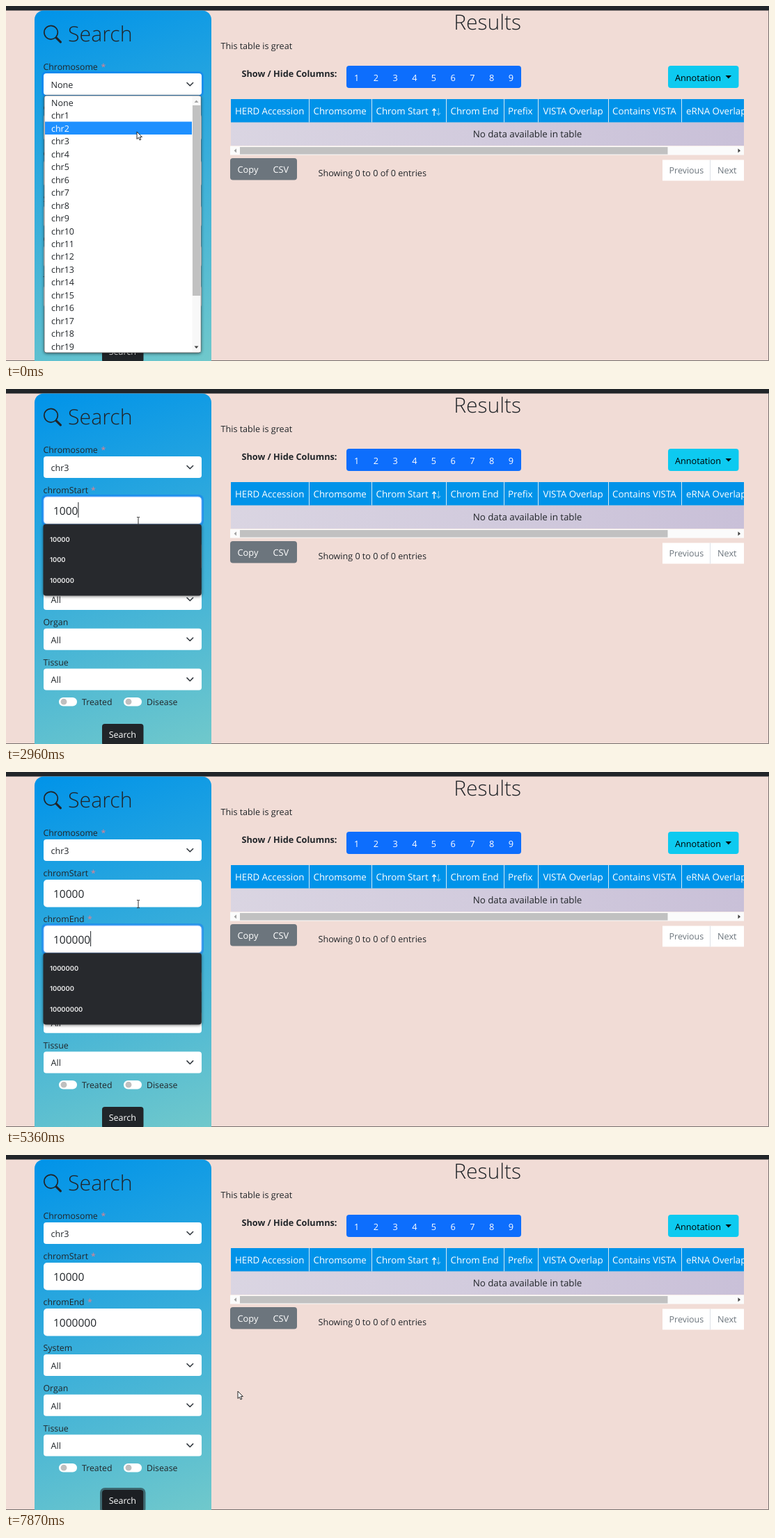
Write an HTML page that moves like this. It is 1096 px wide and 511 px high and loops after 8 s.

```html
<!DOCTYPE html>
<html lang="en">
<head>
<meta charset="utf-8">
<title>Region search</title>
<style>
  html, body { margin: 0; width: 100%; height: 100%; overflow: hidden; background: #f1dcd6; }
  svg { display: block; }
  text { font-family: "Open Sans", "Noto Sans", sans-serif; text-rendering: geometricPrecision; white-space: pre; }
  .list text { font-family: Inter, sans-serif; font-weight: 600; }
  .shade { filter: drop-shadow(0 1px 2px #0008); }
</style>
</head>
<body>
<svg width="1096" height="511" viewBox="0 0 1096 511">
  <defs>
    <linearGradient id="sea" gradientUnits="userSpaceOnUse" x1="58" y1="-1" x2="278" y2="603">
      <stop stop-color="#0093e9"/><stop offset="1" stop-color="#80d0c7"/>
    </linearGradient>
    <linearGradient id="row"><stop stop-color="#dad5e2"/><stop offset="1" stop-color="#c9c0d8"/></linearGradient>
    <clipPath id="table"><rect x="322" y="134" width="738" height="70"/></clipPath>
  </defs>
  <g id="page"></g>
  <g id="live"></g>
</svg>
<script>
const LOOP = 8000, BLINK = 530, INK = '#212529', GREY = '#6c757d';
const page = document.getElementById('page'), live = document.getElementById('live');

const rect = (x, y, w, h, fill, r = 0, more = '') =>
  `<rect x="${x}" y="${y}" width="${w}" height="${h}" fill="${fill}" rx="${r}" ${more}/>`;
const text = (x, y, str, size = 12.6, fill = INK, more = '') =>
  `<text x="${x}" y="${y}" font-size="${size}" fill="${fill}" ${more}>${str}</text>`;
const path = (d, fill, more = '') => `<path d="${d}" fill="${fill}" ${more}/>`;
const line = (d, color, width = 1) => path(d, 'none', `stroke="${color}" stroke-width="${width}"`);
const label = (y, str, star) => text(53.5, y, str, 12.35) + (star ? text(star, y, '*', 12.35, '#e8808c') : '');
const ring = (x, y, w, h, color) => rect(x - 1.5, y - 1.5, w + 3, h + 3, 'none', 5.5, `stroke="${color}" stroke-width="3"`);

function select(y, value, focus) {
  return (focus ? ring(54, y, 227, 31, '#0d6efd66') : '') +
    rect(54, y, 227, 31, '#fff', 4) + text(64.5, y + 21, value) +
    path(`M260 ${y + 13.5}l4.3 4.3 4.3-4.3`, 'none',
      'stroke="#343a40" stroke-width="1.6" stroke-linecap="round" stroke-linejoin="round"');
}

function toggle(x, str) {
  return rect(x, 444, 26, 12.5, '#fff', 6.25) + `<circle cx="${x + 7}" cy="450.2" r="4.4" fill="#bfbfbf"/>` +
    text(x + 33, 455, str, 12.3);
}

function drawPage() {
  const heads = [[329, 'HERD Accession'], [441.5, 'Chromsome'], [531.5, 'Chrom Start'], [638.5, 'Chrom End'],
    [721, 'Prefix'], [771.5, 'VISTA Overlap'], [871, 'Contains VISTA'], [977, 'eRNA Overlap']];
  const digits = [...'123456789'].map((d, i) =>
    text(503.7 + i * 27.7, 107.5, d, 12.7, '#fff', 'text-anchor="middle"')).join('');

  page.innerHTML =
    rect(0, 0, 1096, 511, '#f1dcd6') + rect(0, 0, 1096, 6.5, INK) +
    line('M1095.5 6V510.5H0', '#77706e') +
    rect(41, 6.5, 254, 590, 'url(#sea)', 13) +
    path('M11.742 10.344a6.5 6.5 0 1 0-1.397 1.398h-.001c.03.04.062.078.098.115l3.85 3.85a1 1 0 0 0 1.415-1.414l-3.85-3.85a1 1 0 0 0-.115-.1zM12 6.5a5.5 5.5 0 1 1-11 0 5.5 5.5 0 0 1 11 0z',
      INK, 'transform="translate(54 27.5) scale(1.625)"') +
    text(89, 51, 'Search', 30.3, INK, 'font-weight="300"') +
    label(92, 'Chromosome', 136.5) + label(150, 'chromStart', 122) + label(216, 'chromEnd', 117) +
    label(282, 'System') + label(339.5, 'Organ') + label(397.5, 'Tissue') +
    select(287, 'All') + select(344.7, 'All') + select(402.4, 'All') +
    toggle(76, 'Treated') + toggle(169, 'Disease') +

    text(691.7, 34, 'Results', 30, INK, 'font-weight="300" text-anchor="middle"') +
    text(308.5, 62, 'This table is great') +
    text(338.5, 102, 'Show / Hide Columns:', 12.7, INK, 'font-weight="700"') +
    rect(489, 86, 251, 32, '#0d6efd', 4) + digits +
    rect(951, 86, 101.5, 32, '#0dcaf0', 4) + text(961, 107.5, 'Annotation', 12.7, '#000') +
    path('M1033.5 100h8.6l-4.3 4.5z', '#000') +

    rect(323, 134, 737, 33.5, '#0093e9') + rect(323, 168, 737, 33, 'url(#row)') +
    '<g clip-path="url(#table)">' + heads.map(([x, s]) => text(x, 155.7, s, 13.3, '#fff')).join('') + '</g>' +
    [435, 525, 632, 715, 764, 865, 970].map(x => rect(x, 134, 1, 33.5, '#d5e9f5')).join('') +
    line('M615 158v-10m-2.7 3l2.7-3 2.7 3', '#fff', 1.3) + line('M621.3 147v10m-2.7-3l2.7 3 2.7-3', '#ffffff70', 1.2) +
    text(749, 188.7, 'No data available in table', 13.3, INK, 'text-anchor="middle"') +
    rect(322, 201.5, 738, 13, '#fbfbfb') + rect(336, 203, 614.5, 10.5, '#c1c1c1') +
    path('M331 205.2v6l-3.5-3z', '#a3a3a3') + path('M1051.5 205.2v6l3.5-3z', '#404040') +

    rect(322, 219, 96, 31.5, GREY, 4) + text(332.5, 240.3, 'Copy', 12.8, '#fff') + text(383.5, 240.3, 'CSV', 12.8, '#fff') +
    text(448.5, 245.3, 'Showing 0 to 0 of 0 entries') +
    rect(943, 221.5, 117, 30, '#fff') + rect(1011, 221.5, 1, 30, '#dee2e6') +
    text(952.5, 241.3, 'Previous', 12.5, GREY) + text(1022, 241.3, 'Next', 12.7, GREY);
}

// Latest entry [time, ...values] that has started.
const at = (steps, t) => steps.findLast(s => s[0] <= t) || [0];

const typeStart = [[1330, 0], [2280, 1], [2420, 2], [2690, 3], [2960, 4], [3100, 5]];
const typeEnd = [[3520, 0], [4360, 1], [4510, 2], [4780, 3], [4910, 4], [5050, 5], [5360, 6], [5630, 7]];
const startHits = ['10000', '1000', '100000', '100', '1', '121212'];
const endHits = ['1000000', '100000', '10000', '10000000', '12211212', '10'];
// [time, shortest prefix length the listed values must share]
const startFilter = [[1330, 0], [2550, 2], [2960, 4], [3100, 5]];
const endFilter = [[4360, 1], [4650, 2], [4780, 3], [5360, 6], [5770, 7]];
const CLOSE = 780, TAB = 3520, CLICK = 7050;

const mouse = [[0, 188, 181], [140, 188, 185], [290, 188, 190], [430, 188, 194], [1050, 188, 191], [1190, 188, 189],
  [1730, 190, 190], [6460, 178, 380], [6600, 178, 420], [6740, 177, 465], [6880, 176, 490], [7020, 176, 494],
  [7590, 200, 470], [7730, 283, 385], [7870, 333, 340]];

function field(y, steps, t, value, hint, hintX, focus) {
  const [since, n] = at(steps, t);
  let out = (focus ? ring(54, y, 227, 39.5, '#0d6efd66') : '') +
    rect(54, y, 227, 39.5, '#fff', 5, focus ? 'stroke="#86b7fe"' : '');
  out += n ? text(68, y + 26, value.slice(0, n), 15.5) : text(hintX, y + 26, hint, 15.6, GREY);
  if (focus && Math.floor((t - since) / BLINK) % 2 === 0)
    out += rect(68 + (n || 0) * 8.85, y + 8, 1, 22, INK);
  return out;
}

function hints(y, values, prefix, hover) {
  const rows = values.filter(v => v.startsWith(prefix));
  return '<g class="list">' + rect(53.5, y, 227.3, rows.length * 29.7 + 14, '#27292d', 4, 'class="shade"') +
    (hover ? rect(53.5, y + 6.5, 227.3, 29.7, '#414345') : '') +
    rows.map((v, i) => text(63, y + 25 + i * 29.7, v, 9.4, '#f2f2f2')).join('') + '</g>';
}

function menu(hot) {
  let out = rect(55, 129, 225, 370, '#fff', 3, 'stroke="#666" stroke-width=".8" class="shade"') +
    rect(56, 166.5 + (hot - 2) * 18.47, 211, 18.5, '#1e90ff');
  for (let i = 0; i < 20; i++)
    out += text(65, 143.8 + i * 18.47, i ? 'chr' + i : 'None', 12.5, i === hot ? '#fff' : INK);
  return out + rect(267.5, 130, 12, 368, '#f8f8f8') + rect(268, 143, 11.5, 274, '#c1c1c1') +
    path('M270.5 139h6l-3-3.5z', '#a3a3a3') + path('M270.5 489.5h6l-3 3.5z', '#404040');
}

function pointer(t, open) {
  const [, x, y] = at(mouse, t);
  if (!open && y > 155 && y < 195)
    return line(`M${x - 2} ${y - 5.5}h1.5l.5.5.5-.5h1.5M${x} ${y - 5}v10M${x - 2} ${y + 5.5}h1.5l.5-.5.5.5h1.5`, '#333');
  return path('M0 0V10.5L2.4 8.3 4 12 5.8 11.2 4.2 7.6H7.4Z', '#fff',
    `stroke="#111" stroke-width=".9" transform="translate(${x} ${y})"`);
}

function scene(t) {
  const open = t < CLOSE, inStart = t >= 1330 && t < TAB, inEnd = t >= TAB && t < CLICK;
  const clicked = t >= CLICK;
  let out = select(97, open ? 'None' : 'chr3', t < 1330) +
    field(155, typeStart, t, '10000', 'e.g. 10000', 71.5, inStart) +
    field(221, typeEnd, t, '1000000', 'e.g. 20000', 67, inEnd) +
    (clicked ? ring(138, 482, 59.5, 31, '#21252990') : '') +
    rect(138, 482, 59.5, 31, t >= 6880 ? '#1c1f23' : INK, 4) + text(147.7, 502.3, 'Search', 12.5, '#fff');
  if (open) out += menu(t < 290 ? 2 : 3);
  if (inStart) out += hints(194.5, startHits, '10000'.slice(0, at(startFilter, t)[1]));
  if (inEnd && t >= 4360)
    out += hints(260.5, endHits, '1000000'.slice(0, at(endFilter, t)[1]), t >= 6460 && t < 6600);
  return out + pointer(t, open);
}

let shown = '';
function tick(now) {
  const next = scene(now % LOOP);
  if (next !== shown) live.innerHTML = shown = next;
  requestAnimationFrame(tick);
}

drawPage();
const begin = performance.now();
tick(0);
function tickFrom() { return performance.now() - begin; }
</script>
</body>
</html>
```
